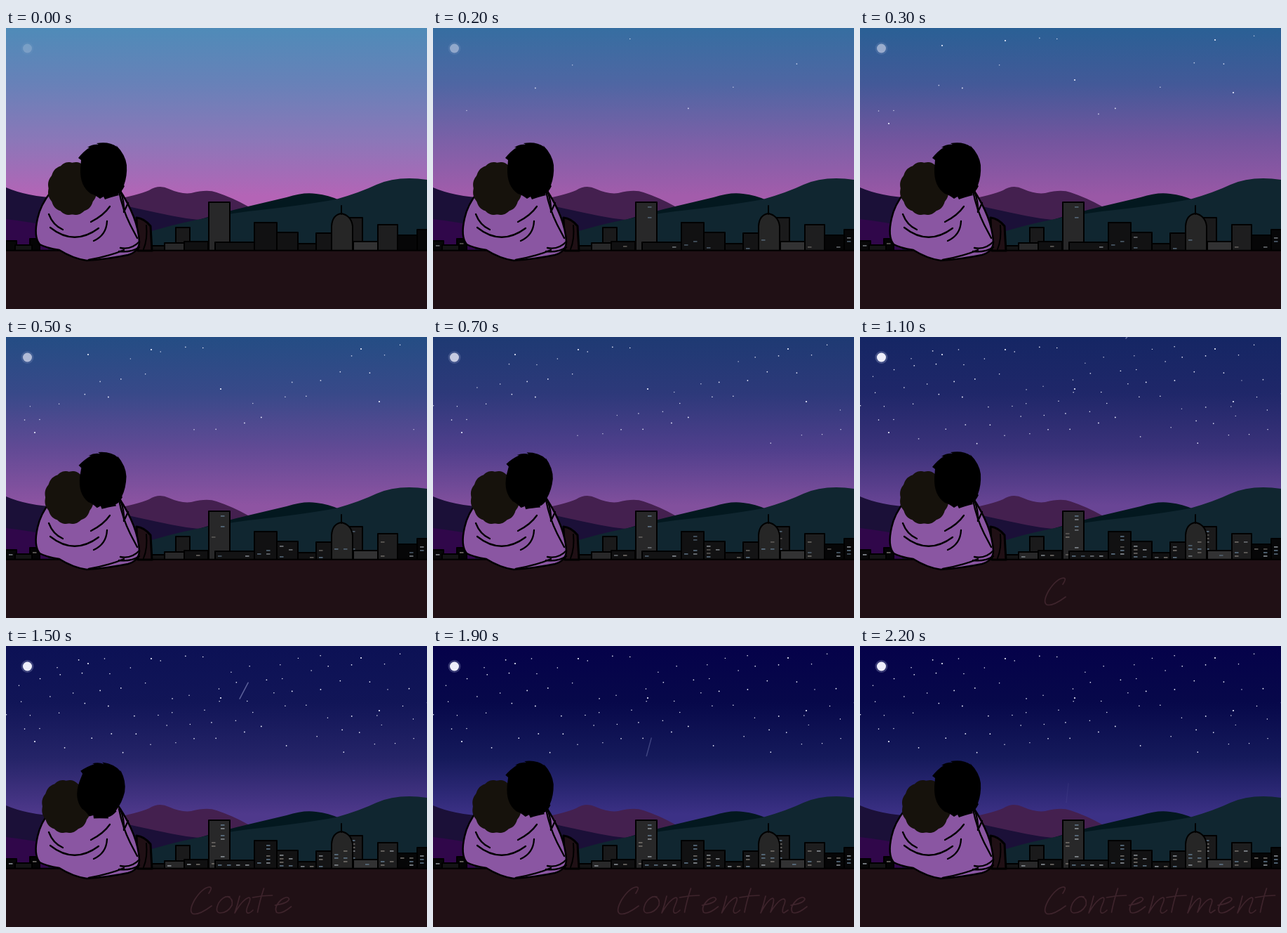
Animation of 600 by 400 pixels, one loop 2.4 s. Source, as an HTML page with a canvas:

```html
<!DOCTYPE html>
<html lang="en">
<head>
<meta charset="utf-8">
<title>Contentment</title>
<style>
html, body { margin: 0; width: 100%; height: 100%; overflow: hidden; background: #201015; }
canvas { display: block; }
</style>
</head>
<body>
<canvas id="stage" width="600" height="400" role="img" aria-label="Contentment"></canvas>
<script>
const c = document.getElementById('stage').getContext('2d');
c.lineCap = c.lineJoin = 'round';
const LOOP = 2400, STEP = 100, GROUND = 317, DARK = 1100;
const clamp = v => Math.max(0, Math.min(1, v));
const mix = (a, b, f) => a + (b - a) * f;

function seeded(seed) {
  return () => (seed = seed * 16807 % 2147483647) / 2147483647;
}
// Position of t among key times: index and fraction to the next key.
function locate(times, t) {
  let i = 0;
  while (i < times.length - 2 && t >= times[i + 1]) i++;
  return [i, clamp((t - times[i]) / (times[i + 1] - times[i]))];
}
function shape(d, fill, stroke, width = 2) {
  const p = new Path2D(d);
  if (fill) { c.fillStyle = fill; c.fill(p); }
  if (stroke) { c.strokeStyle = stroke; c.lineWidth = width; c.stroke(p); }
}
function disc(x, y, r, fill) {
  c.fillStyle = fill;
  c.beginPath();
  c.arc(x, y, r, 0, 7);
  c.fill();
}

// Evenly spaced colours from the top to the horizon, at each key time
const skyTimes = [0, 300, 700, 1800];
const skyColors = [
  '4f8bb8 6881b8 8b77b8 b464b6',
  '2a6095 435998 73559e 9a58a6',
  '1e3a73 2d397a 503f8c 82509d',
  '05024a 07084a 151a5b 3c3186'
].map(row => row.split(' ').map(h => [0, 2, 4].map(k => parseInt(h.slice(k, k + 2), 16))));

function sky(t) {
  const [i, f] = locate(skyTimes, t);
  const g = c.createLinearGradient(0, 0, 0, 240);
  skyColors[i].forEach((from, s) => {
    const rgb = from.map((v, k) => Math.round(mix(v, skyColors[i + 1][s][k], f)));
    g.addColorStop(s / 3, `rgb(${rgb})`);
  });
  c.fillStyle = g;
  c.fillRect(0, 0, 600, 320);
}

// A few bright stars, then an even scatter that comes out as it gets dark
const brightStars = [[117, 25], [207, 18], [306, 74], [506, 17], [532, 92], [41, 136]];
const STARS = 88;
function stars(t) {
  const rand = seeded(41);
  if (t >= 300) brightStars.forEach(([x, y]) => disc(x, y, 1.1, '#eef0ff'));
  for (let i = 1; i <= STARS; i++) {
    const x = 600 * (i * .618 % 1), y = 4 + 140 * (i * .7549 % 1);
    const dx = 14 * rand(), dy = 12 * rand(), r = .7 + .2 * rand();
    const start = DARK * (i / STARS) ** .7;
    if (t < start) continue;
    c.globalAlpha = Math.min(1, .7 + (t - start) / 1200);
    disc(x + dx - 7, y + dy, r, '#eef0ff');
  }
  c.globalAlpha = 1;
}

function moon(t) {
  const a = Math.min(1, .2 + .8 * (t / DARK) ** .75);
  c.globalAlpha = a * .25;
  disc(30.5, 29, 9, '#c9cfee');
  c.globalAlpha = a;
  disc(30.5, 29, 6.5, '#eeeefa');
  c.globalAlpha = 1;
}

function shootingStar(t) {
  if (t < DARK) return;
  const u = (t - DARK) / 1100;
  const at = v => [379 - 150 * v + 65 * v * v, 2 + 190 * v + 31 * v * v];
  c.strokeStyle = `rgba(150,155,205,${mix(.65, .08, u * u)})`;
  c.lineWidth = 1.5;
  c.beginPath();
  c.moveTo(...at(u));
  c.lineTo(...at(u - .11));
  c.stroke();
}

function hills() {
  shape('M150 245Q188 238 204 231Q218 222 232 229Q250 237 264 235Q287 229 300 234Q324 242 345 254L300 290H150Z', '#44204f');
  shape('M0 227Q30 240 75 242L165 252Q210 262 240 268Q270 274 300 274L260 318H0Z', '#1b1038');
  shape('M0 272Q35 276 60 282V318H0Z', '#30074a');
  shape('M268 275Q310 262 345 254L400 241Q425 233 442 236Q460 238 475 245L400 275Z', '#03181f');
  shape('M195 293Q260 272 345 261Q420 253 470 244Q505 234 528 223Q558 210 600 216V318H195Z', '#102630');
}

// x, top, width, shade; back to front
const buildings = [
  [0, 303, 15, 7], [34, 300, 14, 4], [13, 309, 24, 20], [208, 310, 20, 20],
  [242, 284, 20, 26], [254, 304, 34, 16], [226, 306, 28, 40], [289, 248, 30, 40],
  [298, 305, 58, 19], [386, 291, 30, 18], [354, 277, 32, 17], [416, 307, 28, 17],
  [442, 292, 24, 20], [488, 270, 20, 26], [558, 295, 30, 6], [586, 287, 16, 7],
  [530, 280, 28, 30], [495, 304, 35, 50]
];
const glass = ['#8f959b', '#62788c', '#77736e'];

// Rows of small panes, lit one by one as the evening goes on
function windows(x, top, width, rand, t) {
  for (let y = top + 6; y < GROUND - 3; y += 5) {
    for (let px = x + 4; px < x + width - 7; px += 13) {
      const exists = rand() < .62, start = DARK * rand() ** .85, color = glass[Math.floor(rand() * 3)];
      if (!exists || t < start) continue;
      c.globalAlpha = Math.min(.85, .6 + (t - start) / 2500);
      c.fillStyle = color;
      c.fillRect(px, y, 5.5, 1.8);
    }
  }
  c.globalAlpha = 1;
}

function city(t) {
  const rand = seeded(77);
  for (const [x, top, width, shade] of buildings) {
    shape(`M${x} ${top}h${width}V${GROUND}h${-width}z`, `rgb(${shade},${shade},${shade + 1})`, '#000');
    windows(x, top, width, rand, t);
  }
  shape('M464 317V282Q465 266 478 264Q492 267 494 282V317Z', '#262626', '#000');
  shape('M478 253V265', null, '#000');
  windows(464, 285, 30, rand, t);
}

function ground() {
  c.fillStyle = '#201015';
  c.fillRect(0, GROUND, 600, 83);
  c.fillStyle = '#000';
  c.fillRect(0, 315.7, 600, 2);
}

// Handwriting: advance and stroke of each letter, from its left edge on the baseline
const glyphs = {
  C: [37, 'M26-29Q32-38 27-38Q17-37 6-20Q-3-4 3 0Q11 3 30-11'],
  o: [26, 'M19-24Q10-26 3-15Q-3-2 5-1Q16-1 22-12Q24-22 16-24'],
  n: [27.5, 'M7-25Q4-12 0-1Q11-20 20-23Q24-23 19-12Q15-3 18-1Q21 0 26-5'],
  t: [28, 'M14-36Q8-18 5-2M-2-23Q12-26 26-26'],
  e: [30, 'M2-12Q21-15 22-21Q20-26 11-20Q0-10 4-2Q10 2 25-10'],
  m: [41, 'M7-25Q4-12 0-1Q10-20 17-22Q21-22 14-2Q26-21 33-21Q37-20 32-9Q30-1 33-1L39-5']
};
function lettering(t) {
  const shown = clamp((t - 1000) / STEP / 11) * 11;
  c.save();
  c.translate(263, 381);
  for (const letter of 'Contentment'.slice(0, Math.round(shown))) {
    const [advance, stroke] = glyphs[letter];
    shape(stroke, null, '#3e242c', 1.7);
    c.translate(advance, 0);
  }
  c.restore();
}

// An oval with a scalloped edge
let curlyHair = '';
for (let a = 0; a < 6.28; a += .05) {
  const k = .98 + .04 * Math.abs(Math.sin(6 * a));
  curlyHair += `${a ? 'L' : 'M'}${94.5 + 34.5 * k * Math.cos(a)} ${228.5 + 37.5 * k * Math.sin(a)}`;
}
const darkHair = 'M106 200L107 188L103 185Q110 176 119 170L116 170Q124 165 132 166L129 164'
  + 'Q147 161 158 169L157 167Q170 180 172 195Q173 211 168 224L169 225Q164 235 160 236L161 238'
  + 'Q149 241 141 244L139 240L134 243Q126 237 121 236Q105 225 106 200Z';
const folds = ['M61 265Q67 281 81 287', 'M63 284Q97 311 132 285', 'M148 254Q139 267 121 276',
  'M144 275Q143 295 125 303', 'M161 232Q166 258 177 280L187 299', 'M163 232Q169 248 168 262L174 249',
  'M118 330Q150 324 168 316', 'M163 313Q179 316 190 304', 'M161 318Q178 320 190 312'];

// How far the two heads lean to the left
const leanTimes = [0, 200, 300, 700, 1100, 1500, 2200];
const leans = [0, 1, 1, 2.1, 1, 3, 0];

function couple(t) {
  const [i, f] = locate(leanTimes, t);
  const lean = mix(leans[i], leans[i + 1], f), tilt = Math.max(0, lean - 1);
  shape('M186 270Q197 271 206 282L208 317H188Z', '#201015', '#000', 3);
  shape('M200 281Q202 300 196 315', null, '#000');
  shape('M64 233Q49 252 45 271Q39 297 48 308Q57 313 76 316Q95 328 115 331Q145 329 174 323'
    + 'Q190 318 190 304Q188 270 161 229L120 215Z', '#8a56a2', '#000', 2.5);
  folds.forEach(d => shape(d, null, '#000', 2.3));

  c.save();
  c.translate(-2.9 * lean, 0);
  shape(curlyHair, '#16120c');
  c.restore();

  c.save();
  c.translate(139 - 2 * tilt, 204 + 1.3 * tilt);
  c.rotate(.15 * tilt);
  c.translate(-139, -204);
  shape(darkHair, '#000');
  c.restore();
}

function draw(now) {
  const t = Math.min(2200, Math.floor(now % LOOP / STEP) * STEP);
  sky(t);
  stars(t);
  moon(t);
  shootingStar(t);
  hills();
  city(t);
  ground();
  lettering(t);
  couple(t);
}

const begin = performance.now();
function tick() {
  draw(performance.now() - begin);
  requestAnimationFrame(tick);
}
tick();
</script>
</body>
</html>
```
